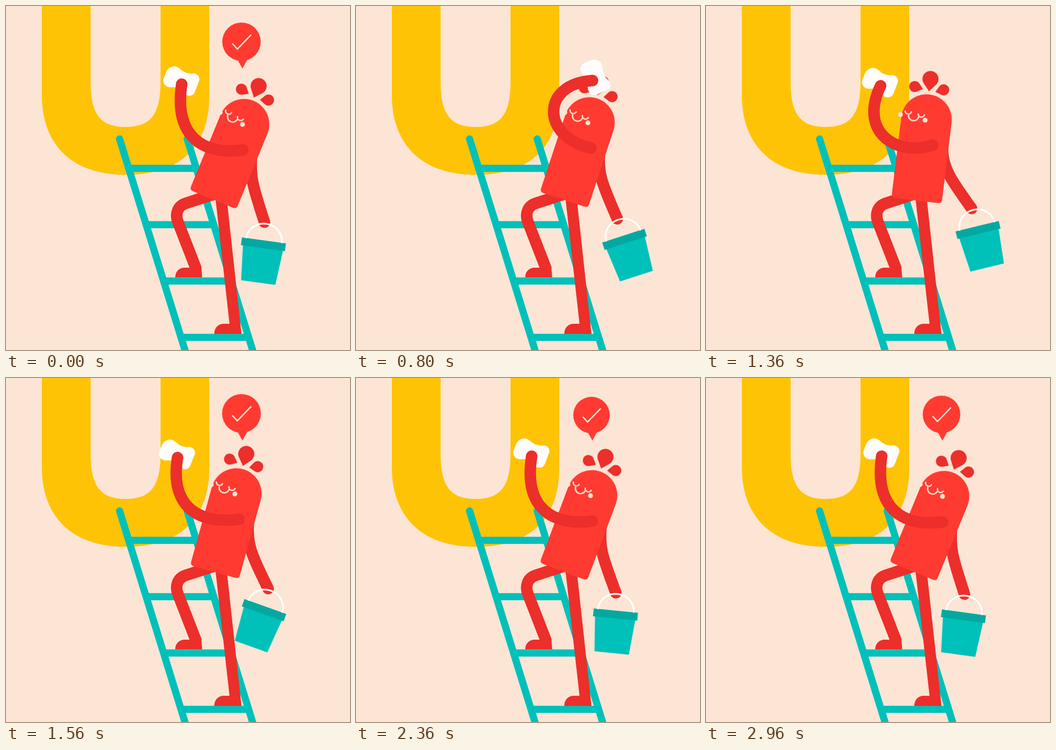
Recreate the animation shown at these times as an HTML page without scripts. Size 748 by 748 pixels, loop 3 s.

```html
<!DOCTYPE html>
<html lang="en">
<head>
<meta charset="utf-8">
<title>Letter cleaner</title>
<style>
html, body { margin: 0; width: 100%; height: 100%; overflow: hidden; background: #fce5d5; }
svg { display: block; width: 100vw; height: 100vh; }

.bg { fill: #fce5d5; }
.letter { fill: #ffc305; }
.skin { fill: #ff3a31; }
.limb { fill: #ec2f2a; }
.bone { fill: none; stroke: #ec2f2a; stroke-width: 25; stroke-linecap: round; }
.ladder { fill: none; stroke: #00c0ba; stroke-width: 15.6; }
.line { fill: none; stroke: #fce5d5; stroke-width: 3; }

.body, .arm, .back-arm, .carry, .swing, .sponge, .bubble {
  animation: 3s ease-in-out infinite;
}
.body { animation-name: lean; }
.arm { animation-name: wipe; }
.back-arm { animation-name: hang; }
.carry { animation-name: carry; }
.swing { animation-name: swing; }
.sponge { animation-name: sponge; transform-origin: 381px 163px; }
.bubble { animation-name: pop; transform-origin: 514px 136px; }

/* Body, arms, sponge and bucket grip share the same beats */
@keyframes lean {
  0%, 96%, 100% { transform: rotate(22.4deg); }
  13.33% { transform: rotate(33.4deg); }
  21.33% { transform: rotate(33.4deg); animation-timing-function: ease-in; }
  26.67% { transform: rotate(18.4deg); animation-timing-function: ease-out; }
  35.33% { transform: rotate(-4.8deg); animation-timing-function: ease-in; }
  38.67% { transform: rotate(-3.7deg); animation-timing-function: cubic-bezier(.33,.15,.6,.9); }
  52% { transform: rotate(15.5deg); animation-timing-function: linear; }
  78.67% { transform: rotate(20.6deg); animation-timing-function: ease-out; }
}
@keyframes wipe {
  0%, 96%, 100% { d: path("M515 313C430 325 365 285 382 170"); }
  13.33% { d: path("M531 325C480 250 490 165 606 153"); }
  21.33% { d: path("M531 325C480 250 490 165 606 153"); animation-timing-function: ease-in; }
  26.67% { d: path("M511 309C405 285 400 170 515 162"); animation-timing-function: ease-out; }
  35.33% { d: path("M473 297C394 340 300 256 385 173"); animation-timing-function: ease-in; }
  38.67% { d: path("M475 297C395 340 303 258 388 174"); animation-timing-function: cubic-bezier(.33,.15,.6,.9); }
  52% { d: path("M507 307C422 319 355 282 373 173"); animation-timing-function: linear; }
  78.67% { d: path("M514 311C428 323 364 283 382 170"); animation-timing-function: ease-out; }
}
@keyframes sponge {
  0%, 78.67%, 100% { transform: none; }
  13.33% { transform: translate(232px, -16px) rotate(72deg); }
  21.33% { transform: translate(232px, -16px) rotate(72deg); animation-timing-function: ease-in; }
  26.67% { transform: translate(139px, -8px) rotate(45deg); animation-timing-function: ease-out; }
  35.33% { transform: translate(3px, 3px) rotate(0deg); animation-timing-function: ease-in; }
  38.67% { transform: translate(5.5px, 4px) rotate(0deg); animation-timing-function: cubic-bezier(.33,.15,.6,.9); }
  52% { transform: translate(-9.5px, 3px) rotate(1deg); animation-timing-function: linear; }
}
@keyframes hang {
  0%, 96%, 100% { d: path("M534 325C530 375 538 395 562 470"); }
  13.33% { d: path("M545 340C531 385 533 410 545 488"); }
  21.33% { d: path("M545 340C531 385 533 410 545 488"); animation-timing-function: ease-in; }
  26.67% { d: path("M530 318C525 365 536 388 568 463"); animation-timing-function: ease-out; }
  35.33% { d: path("M496 300C504 340 525 357 588 415"); animation-timing-function: ease-in; }
  38.67% { d: path("M498 300C505 341 525 360 587 418"); animation-timing-function: cubic-bezier(.33,.15,.6,.9); }
  52% { d: path("M527 315C523 362 534 384 570 458"); animation-timing-function: linear; }
  78.67% { d: path("M533 322C528 373 538 393 565 467"); animation-timing-function: ease-out; }
}
@keyframes carry {
  0%, 96%, 100% { transform: translate(566px, 473px); }
  13.33% { transform: translate(547.8px, 490.4px); }
  21.33% { transform: translate(547.8px, 490.4px); animation-timing-function: ease-in; }
  26.67% { transform: translate(569.7px, 464.5px); animation-timing-function: ease-out; }
  35.33% { transform: translate(588px, 416px); animation-timing-function: ease-in; }
  38.67% { transform: translate(586.5px, 418.6px); animation-timing-function: cubic-bezier(.33,.15,.6,.9); }
  52% { transform: translate(576.4px, 462px); animation-timing-function: linear; }
  78.67% { transform: translate(568.7px, 469px); animation-timing-function: ease-out; }
}
@keyframes swing {
  0%, 100% { transform: rotate(7.8deg); }
  13.33% { transform: rotate(8.3deg); }
  21.33% { transform: rotate(8.3deg); animation-timing-function: ease-in; }
  26.67% { transform: rotate(-17.8deg); animation-timing-function: ease-out; }
  37% { transform: rotate(-57deg); animation-timing-function: ease-in; }
  38.67% { transform: rotate(-55.6deg); animation-timing-function: cubic-bezier(.33,.15,.6,.9); }
  52% { transform: rotate(19.6deg); animation-timing-function: ease-out; }
  57.33% { transform: rotate(24deg); }
  65.33% { transform: rotate(21deg); animation-timing-function: ease-in; }
  78.67% { transform: rotate(5.7deg); animation-timing-function: ease-out; }
  84.67% { transform: rotate(-2.5deg); }
  94.67% { transform: rotate(8.1deg); }
}
/* Damped spring, two swings a second */
@keyframes pop {
  0% { transform: scale(1); animation-timing-function: ease-in; }
  5.33% { transform: scale(0); }
  48% { transform: scale(0); animation-timing-function: linear; }
  52% { transform: scale(1); animation-timing-function: cubic-bezier(.2,.6,.5,1); }
  55.75% { transform: scale(1.355); animation-timing-function: cubic-bezier(.37,0,.63,1); }
  64.08% { transform: scale(.785); animation-timing-function: cubic-bezier(.37,0,.63,1); }
  72.41% { transform: scale(1.131); animation-timing-function: cubic-bezier(.37,0,.63,1); }
  80.75% { transform: scale(.921); animation-timing-function: cubic-bezier(.37,0,.63,1); }
  89.08% { transform: scale(1.048); animation-timing-function: cubic-bezier(.37,0,.63,1); }
  97.41% { transform: scale(.971); }
  100% { transform: scale(.983); }
}
</style>
</head>
<body>
<svg viewBox="0 0 748 748">
  <defs>
    <path id="drop" d="M0 0L13.3-15.7A17.5 17.5 0 1 0-13.3-15.7z"/>
  </defs>

  <rect class="bg" width="748" height="748"/>
  <path class="letter" d="M78 0H184V165C184 235 205 263 260 263C315 263 336 235 336 165V0H442V195C442 300 385 367 260 367C137 367 78 295 78 195z"/>

  <g class="ladder">
    <path stroke-linecap="round" d="M247 289L395 767M394 289L542 767"/>
    <path d="M266.8 353h147M304.7 475.5h147M342.6 598h147M380.5 720.5h147"/>
  </g>

  <!-- legs -->
  <path class="bone" stroke-linecap="butt" style="stroke-linecap:butt" d="M465 405L391 429C373 435 367 452 374 470L414 573"/>
  <path class="limb" d="M368 590C368 577 377 569 389 569H425L426.5 590z"/>
  <path class="limb" d="M454 405H478.5L512 713H453C453 699 462 691 474 691H486z"/>

  <path class="bone back-arm" d="M534 325C530 375 538 395 562 470"/>
  <g class="carry">
    <g class="swing">
      <path fill="#00c0ba" d="M-44 53H44L37.5 129.5H-37.5z"/>
      <rect fill="#05a8a0" x="-48.3" y="37" width="96.6" height="17"/>
      <path fill="none" stroke="#fff" stroke-width="3.6" d="M-39 37.5A39 37 0 0 1 39 37.5"/>
    </g>
  </g>

  <g transform="translate(461.5 393)">
    <g class="body">
      <g class="limb">
        <use href="#drop" transform="translate(-2.2 -208.8)"/>
        <use href="#drop" transform="translate(-15.7 -212.2) rotate(-80.5) scale(.69)"/>
        <use href="#drop" transform="translate(11.8 -209.2) rotate(69) scale(.69)"/>
      </g>
      <path class="skin" d="M-55 22V-147A55 55 0 0 1 55-147V22Q55 30 47 30H-47Q-55 30-55 22z"/>
      <g class="bg">
        <circle cx="-57.6" cy="-151" r="5.3"/>
        <circle cx="-2.9" cy="-145.5" r="5.3"/>
      </g>
      <path class="line" d="M-48.5-161a7 7 0 0 0 14 0M-19.5-158a7 7 0 0 0 14 0M-40-152.5a11.3 11.3 0 0 0 22.6 0"/>
    </g>
  </g>

  <path class="sponge" fill="#fffdfb" d="M343 157L348 144C352 134 362 129 371 132C379 135 384 144 396 146C402 148 407 146 411 147C418 149 422 156 420 162L411 186C408 194 401 197 393 194C384 191 382 182 372 178C364 175 358 178 352 176C344 173 340 165 343 157z"/>
  <path class="bone arm" d="M515 313C430 325 365 285 382 170"/>

  <g class="bubble">
    <circle class="skin" cx="512" cy="77.7" r="41.8"/>
    <path class="skin" d="M503 116H525L514 136z"/>
    <path class="line" d="M492 81.5L503 93.5L533 62.5"/>
  </g>
</svg>
</body>
</html>
```
